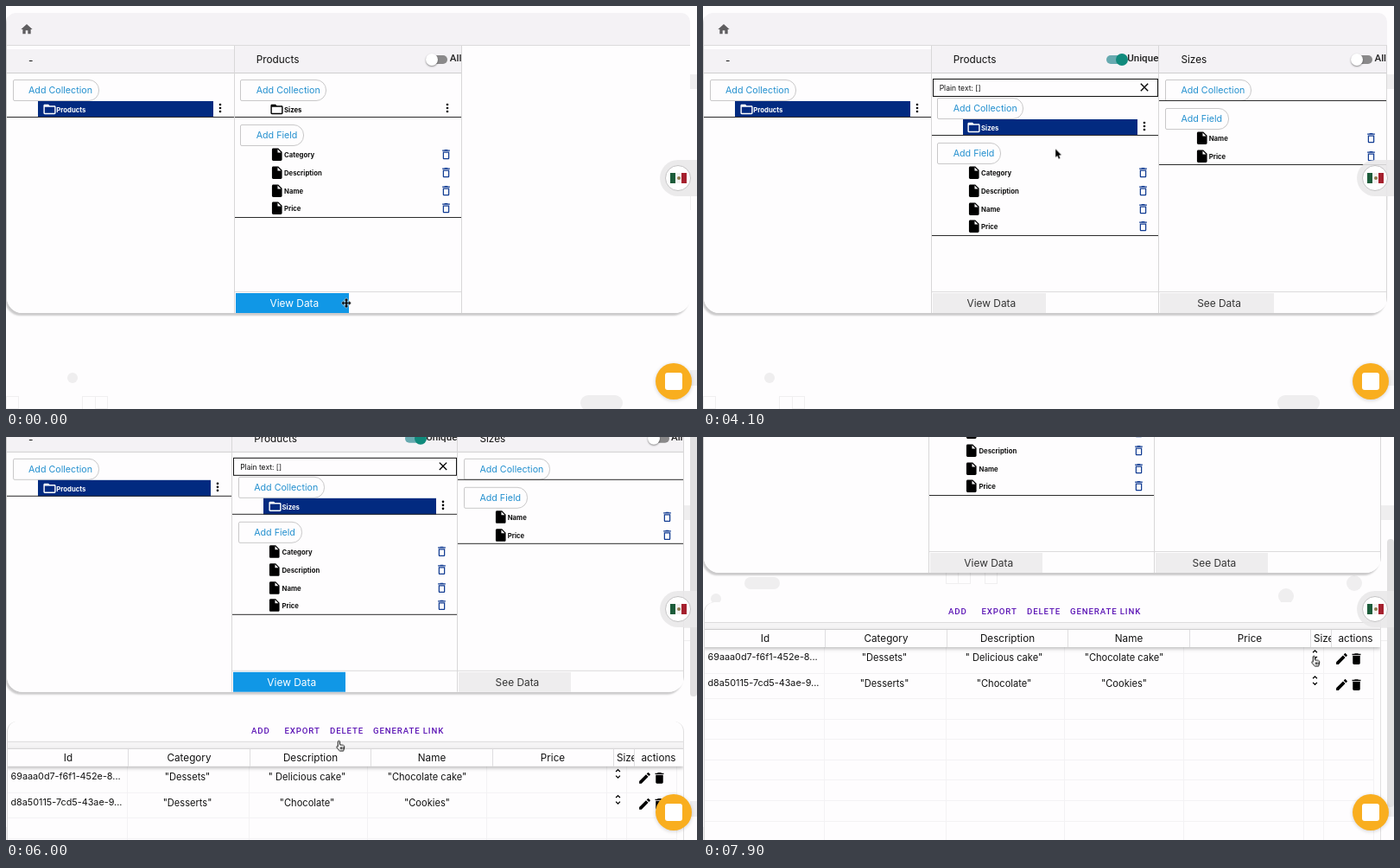
An HTML page for the animation above (8 s loop, 800 px wide and 466 px high).

```html
<!DOCTYPE html>
<html lang="en">
<head>
<meta charset="utf-8">
<title>Collection editor</title>
<style>
html, body { margin: 0; width: 100%; height: 100%; overflow: hidden; background: #fefdfe; }
#stage {
  --w: 263.7px; --drop: 0px; --on: 0; --off: 1; --ripple: 0;
  --row: transparent; --rowx: 37px; --rowink: #000; --third: 0; --table: 0;
  --view: #1097e6; --viewink: #fff; --cross: 1; --arrow: 0; --hand: 0;
  position: relative; width: 800px; height: 466px; overflow: hidden;
  background: #fefdfe; font: 11px Inter, "Open Sans", sans-serif; color: #111;
  animation: state 8s step-end infinite;
}
#stage *, #stage { box-sizing: border-box; }
#stage div, #stage span, #stage svg { position: absolute; }
span { white-space: pre; line-height: 16px; }
.mid { transform: translateX(-50%); }

/* interface states */
@keyframes state {
  3.75% { --view: #eeedee; --viewink: #333; --cross: 0; --arrow: 1; }
  28.75% { --arrow: 0; --hand: 1; }
  31.25% { --drop: 21px; --on: 1; --off: 0; --ripple: 1; }
  33.75% { --arrow: 1; --hand: 0; }
  37.5% { --row: #e6eef6; --rowx: 2px; --arrow: 0; --hand: 1; }
  45% { --ripple: 0; }
  46.25% { --row: #022a80; --rowx: 37px; --rowink: #fff; --third: 1; }
  51.25% { --arrow: 1; --hand: 0; }
  58.75% { --view: #1097e6; --viewink: #fff; --arrow: 0; --hand: 1; }
  68.75% { --w: 261.2px; --table: 1; }
  86.25% { --view: #eeedee; --viewink: #333; }
}
@keyframes scroll {
  0%, 70.6% { transform: translateY(0); }
  75% { transform: translateY(-60px); }
  81.25% { transform: translateY(-157px); }
  86%, 100% { transform: translateY(-198px); }
}
@keyframes thumb {
  0%, 70.6% { transform: translateY(-55px); }
  75% { transform: translateY(-10px); }
  81.25% { transform: translateY(65px); }
  86%, 100% { transform: translateY(118px); }
}
@keyframes point {
  0% { transform: translate(394px, 343.5px); }
  3.75% { transform: translate(395px, 328px); }
  13.75%, 22.5% { transform: translate(399.5px, 237.5px); }
  29%, 33.5% { transform: translate(487px, 61px); }
  40%, 50% { transform: translate(411.5px, 138.5px); }
  60%, 87.5% { transform: translate(385px, 351.5px); }
  90% { transform: translate(394px, 350px); }
  94% { transform: translate(570px, 300px); }
  96.5% { transform: translate(715px, 256px); }
  98.75%, 100% { transform: translate(707px, 253.5px); }
}

/* fixed backdrop */
.blob { background: #efeeef; }
.box { border: 1px solid #f0eff0; }

#doc { left: 0; top: 0; width: 800px; height: 800px; animation: scroll 8s linear infinite; }
#panel {
  left: 1px; top: 8px; width: calc(var(--w) * 3); height: 347px; overflow: hidden;
  border-radius: 10px 10px 18px 18px; background: #fefdfe;
}
#shade {
  left: 1px; top: 8px; width: calc(var(--w) * 3); height: 347px;
  border-radius: 10px 10px 18px 18px; box-shadow: -2px 3px 2px rgba(0, 0, 0, .2);
}
#inner { left: -1px; top: -8px; width: 800px; height: 363px; }
#bar { left: 0; top: 8px; width: 100%; height: 38px; background: #f4f2f5; border-bottom: 1px solid #dcdbdc; }

.col { top: 46px; width: calc(var(--w) + 1px); height: 309px; border-right: 1px solid #d8d7d8; }
.col > .in { left: 0; top: -46px; width: 100%; height: 355px; }
.head { left: 1px; right: 0; top: 46px; height: 32px; background: #f4f2f5; border-bottom: 1px solid #cfcecf; }
.title { left: 26px; top: 54px; font-size: 11.8px; }
.body { left: 0; top: 0; width: 100%; height: 300px; }
.pill {
  left: 7.5px; height: 25px; border: 1px solid #c9c8c9; border-radius: 2px 12px 12px 2px;
  background: #fefdfe; color: #2490cf;
}
.pill span { left: 17.5px; top: 4px; font-size: 10.7px; }
.rule { left: 1px; right: 0; height: 1px; background: #2b2b2b; }
.row { right: 24.2px; height: 19px; }
.name { left: 58.3px; font-size: 7.75px; font-weight: 700; }
.foot { left: 1px; right: 0; top: 330px; height: 25px; border-top: 1px solid #dcdbdc; }
.btn { left: 1px; top: 1px; width: 50%; height: 24px; }
.btn span { left: 50%; top: 3.5px; margin-left: 2.5px; font-size: 11.9px; }
.plain { left: 2px; right: 0; top: 84px; height: 21px; border: 1px solid #111; opacity: var(--on); }
.plain span { left: 7px; top: 2px; font-size: 8.5px; }
.lab { right: 0; top: 52px; font: 500 11.6px/16px Roboto, sans-serif; color: #222; }
.track { width: 21px; height: 10px; top: 57px; border-radius: 5px; }
.knob { width: 14px; height: 14px; top: 55px; border-radius: 50%; }

#table {
  left: 1px; top: 389px; width: calc(var(--w) * 3); height: 420px; opacity: var(--table);
  overflow: hidden; border-radius: 12px 12px 0 0; background: #fefdfe;
  border-left: 1px solid #d9d8d9; border-right: 1px solid #e0dfe0;
}
#grid { left: -2px; top: -389px; width: 800px; height: 810px; }
.act { top: 392px; font: 500 9.67px/16px Roboto, sans-serif; letter-spacing: .0893em; color: #5b14b5; }
.strip { left: 0; top: 412px; width: 784px; height: 8px; background: #f5f4f5; border-top: 1px solid #dddcdd; }
.heads { left: 0; top: 420px; width: 784px; height: 21px; background: #fefdfe;
  border-top: 1px solid #cfcecf; box-shadow: 0 2px 4px rgba(0, 0, 0, .25); }
.heads span { top: 2px; font-size: 11.7px; }
.v { width: 1px; background: #dedddf; }
.faint { background: #f3f2f4; }
.cell { font-size: 11.1px; }

#thumb { left: 792px; top: 0; width: 8px; height: 310px; border-radius: 4px; background: #e1e0e1;
  opacity: var(--table); animation: thumb 8s linear infinite; }
#lang { left: 757px; top: 178px; width: 43px; height: 42px; border-radius: 21px 0 0 21px; background: rgba(233, 232, 233, .88); }
#lang .disc { left: 6px; top: 6px; width: 30px; height: 30px; border-radius: 50%; background: #fff; border: 1px solid #c4c3c4; }
#flag { left: 12px; top: 15px; width: 19px; height: 12px;
  background: linear-gradient(90deg, #1c5c3a 33.3%, #f4f2f2 33.3% 66.6%, #a5202e 66.6%); }
#flag div { left: 7.5px; top: 4px; width: 4px; height: 4px; border-radius: 50%; background: #8d7a4e; }
#chat { left: 752px; top: 413px; width: 42px; height: 42px; border-radius: 50%; background: #f9ae1f;
  box-shadow: 0 1px 4px rgba(0, 0, 0, .18); }
#chat div { left: 11px; top: 11px; width: 20px; height: 20px; border-radius: 3px; background: #fff; }
#cursor { left: 0; top: 0; width: 0; height: 0; animation: point 8s linear infinite; }
#cursor svg { overflow: visible; width: 14px; height: 14px; }
</style>
</head>
<body>
<div id="stage"></div>
<script>
const paths = {
  home: 'M10 20v-6h4v6h5v-8h3L12 3 2 12h3v8z',
  folder: 'M20 6h-8l-2-2H4c-1.1 0-2 .9-2 2v12c0 1.1.9 2 2 2h16c1.1 0 2-.9 2-2V8c0-1.1-.9-2-2-2zm0 12H4V8h16v10z',
  file: 'M6 2c-1.1 0-2 .9-2 2v16c0 1.1.9 2 2 2h12c1.1 0 2-.9 2-2V8l-6-6H6zm7 7V3.5L18.5 9H13z',
  bin: 'M6 19c0 1.1.9 2 2 2h8c1.1 0 2-.9 2-2V7H6v12zM8 9h8v10H8V9zm7.5-5l-1-1h-5l-1 1H5v2h14V4z',
  trash: 'M6 19c0 1.1.9 2 2 2h8c1.1 0 2-.9 2-2V7H6v12zM19 4h-3.5l-1-1h-5l-1 1H5v2h14V4z',
  edit: 'M3 17.25V21h3.75L17.8 9.94l-3.75-3.75L3 17.25zM20.7 7.04c.4-.4.4-1 0-1.4l-2.34-2.35c-.4-.4-1-.4-1.4 0l-1.84 1.83 3.75 3.75z',
  dots: 'M12 8a2 2 0 1 0 0-4 2 2 0 0 0 0 4zm0 2a2 2 0 1 0 0 4 2 2 0 0 0 0-4zm0 6a2 2 0 1 0 0 4 2 2 0 0 0 0-4z',
  sort: 'M12 5.83L15.17 9l1.4-1.4L12 3 7.4 7.6 8.83 9zm0 12.34L8.83 15l-1.4 1.4L12 21l4.6-4.6L15.17 15z',
  close: 'M19 6.4L17.6 5 12 10.6 6.4 5 5 6.4 10.6 12 5 17.6 6.4 19 12 13.4 17.6 19 19 17.6 13.4 12z'
};
const div = (cls, style, inner = '') => `<div class="${cls}" style="${style}">${inner}</div>`;
const text = (cls, style, s) => `<span class="${cls}" style="${style}">${s}</span>`;

// side is "left" or "right"; x and y are the icon's centre
const icon = (name, size, x, y, color = '#000', side = 'left') =>
  `<svg viewBox="0 0 24 24" width="${size}" height="${size}" style="${side}:${x - size / 2}px;top:${y - size / 2}px">` +
  `<path d="${paths[name]}" style="fill:${color}"/></svg>`;

const pill = (label, y, w) => div('pill', `top:${y}px;width:${w}px`, text('', '', label));
const rule = y => div('rule', `top:${Math.floor(y)}px`);

const folderRow = (name, bg, ink, left) =>
  div('row', `left:${left};top:110px;background:${bg}`) +
  icon('folder', 17, 50, 119.5, ink) +
  text('name', `top:111.6px;color:${ink}`, name) +
  icon('dots', 16, 16, 118, '#000', 'right') + rule(128);

const fieldList = (names, y) => pill('Add Field', y, 74) +
  names.map((name, i) => {
    const cy = y + 34.8 + i * 20.8;
    return icon('file', 17.5, 50, cy) + text('name', `top:${cy - 7.8}px`, name) +
      icon('bin', 15, 18, cy - .3, '#123c93', 'right');
  }).join('') + rule(y + 24 + names.length * 20.8);

const switchOff = div('', 'inset:0;opacity:var(--off)',
  div('track', 'right:16px;background:#8a898a') +
  div('knob', 'right:27px;background:#fff;box-shadow:0 1px 2px rgba(0,0,0,.45)') +
  text('lab', '', 'All'));
const switchOn = div('', 'inset:0;opacity:var(--on)',
  div('', 'right:26px;top:45px;width:33px;height:33px;border-radius:50%;background:rgba(110,140,150,.26);opacity:var(--ripple)') +
  div('track', 'right:39px;background:#67aab0') +
  div('knob', 'right:35px;background:#108a7c') +
  text('lab', '', 'Unique'));

const footer = (label, bg, ink) => div('foot', '',
  div('btn', `background:${bg};color:${ink}`, text('mid', '', label)));

const column = (i, inner, style = '') =>
  div('col', `left:calc(var(--w) * ${i});${style}`, div('in', '', inner));

const columns =
  column(0, div('head', 'top:50px;height:28px') + text('title', 'top:55px', '-') +
    pill('Add Collection', 85, 100) + folderRow('Products', '#022a80', '#fff', '37px')) +
  column(1, div('head', '') + text('title', '', 'Products') + switchOff + switchOn +
    div('plain', '', text('', '', 'Plain text: []') + icon('close', 16, 15.5, 8.5, '#000', 'right')) +
    div('body', 'transform:translateY(var(--drop))',
      pill('Add Collection', 85, 100) + folderRow('Sizes', 'var(--row)', 'var(--rowink)', 'var(--rowx)') +
      fieldList(['Category', 'Description', 'Name', 'Price'], 137)) +
    footer('View Data', 'var(--view)', 'var(--viewink)')) +
  column(2, div('head', '') + text('title', '', 'Sizes') +
    div('', 'inset:0;--off:1', switchOff) +
    pill('Add Collection', 85, 100) + rule(109) + fieldList(['Name', 'Price'], 118) +
    footer('See Data', '#eeedee', '#333'), 'opacity:var(--third)');

const mid = (x, y, s, cls = 'mid cell') => text(cls, `left:${x}px;top:${y - 8}px`, s);
const actions = [[284, 'ADD'], [322.5, 'EXPORT'], [375, 'DELETE'], [425, 'GENERATE LINK']]
  .map(([x, s]) => text('act', `left:${x}px`, s)).join('');
const titles = [[72, 'Id'], [212, 'Category'], [352.5, 'Description'], [493, 'Name'], [633, 'Price'], [755.5, 'actions']]
  .map(([x, s]) => text('mid', `left:${x}px`, s)).join('') +
  div('', 'left:707px;top:0;width:20.5px;height:20px;overflow:hidden', text('', 'left:0', 'Sizes'));
const headLines = [141, 282, 422, 563, 703, 727]
  .map(x => div('v', `left:${x}px;top:0;height:20px`)).join('');
const bodyLines = [140, 281, 418, 556, 695, 718, 776]
  .map(x => div('v faint', `left:${x}px;top:441px;height:370px`)).join('') +
  [471, ...Array.from({ length: 13 }, (_, k) => 500 + k * 23.6)]
    .map(y => div('faint', `left:2px;width:775px;top:${y}px;height:1px`)).join('');
const records = [
  ['69aaa0d7-f6f1-452e-8...', '"Dessets"', '" Delicious cake"', '"Chocolate cake"'],
  ['d8a50115-7cd5-43ae-9...', '"Desserts"', '"Chocolate"', '"Cookies"']
].map(([id, cat, desc, name], i) => {
  const y = 452.5 + i * 30;
  return text('cell', `left:5.5px;top:${y - 8}px;font-size:10.8px`, id) +
    mid(210, y, cat) + mid(348.5, y, desc) + mid(487.5, y, name) +
    icon('sort', 15, 708, y - 3.4) + icon('edit', 17, 739.5, y + 1.5) + icon('trash', 17, 756.5, y + 1.5);
}).join('');

const blobs = [[71, 424, 12, 12], [665, 450, 49, 18], [792, 79, 8, 17], [784, 79, 16, 17], [792, 421, 8, 18],
  [700, 215, 12, 12], [640, 228, 41, 14], [48, 162, 41, 14], [666, 175, 18, 18], [745, 160, 18, 18], [9, 181, 12, 12]]
  .map(([x, y, w, h]) => div('blob', `left:${x}px;top:${y}px;width:${w}px;height:${h}px;border-radius:${x > 780 ? 0 : h / 2}px`)).join('');
const boxes = [[0, 451, 15], [88, 451, 16], [103, 451, 15], [751, 221, 11], [761, 221, 11], [777, 220, 16],
  [281, 155, 15], [295, 155, 15], [326, 155, 15]]
  .map(([x, y, s]) => div('box', `left:${x}px;top:${y}px;width:${s}px;height:${s}px`)).join('');

const pointer = (show, x, y, d, fill, line, order) =>
  `<svg style="left:${x}px;top:${y}px;opacity:var(--${show})"><path d="${d}" fill="${fill}" stroke="${line}" stroke-linejoin="round" paint-order="${order}"/></svg>`;
const cursor =
  pointer('cross', 0, 0, 'M0-5.6l2.3 2.5H.8V-.8h2.3v-1.5L5.6 0 3.1 2.3V.8H.8v2.3h1.5L0 5.6l-2.3-2.5h1.5V.8h-2.3v1.5L-5.6 0l2.5-2.3v1.5h2.3v-2.3h-1.5z', '#000', '#fff', 'stroke') +
  pointer('arrow', 0, 0, 'M0 0v9.6l2.2-2 1.5 3.6 1.6-.7-1.5-3.5h3z', '#000', '#fff', 'stroke') +
  pointer('hand', -3.4, -.9, 'M2.3 7.6V2a1.1 1.1 0 0 1 2.2 0v3.3l4 .8q1.4.4 1.3 1.8l-.4 2.4-.8 2.2H4.3L.8 8.4q-.3-1 .6-1.2zM5.2 8v2.6M6.7 8v2.6M8.1 8v2.6', '#fff', '#111', 'fill');

document.getElementById('stage').innerHTML = blobs + boxes +
  `<div id="doc"><div id="shade"></div>
    <div id="panel"><div id="inner"><div id="bar"></div>${icon('home', 16, 24, 26.5, '#5f5e60')}${columns}</div></div>
    <div id="table"><div id="grid">${actions}${bodyLines}${records}
      <div class="strip"></div><div class="heads">${titles}${headLines}</div></div></div>
  </div>
  <div id="thumb"></div>
  <div id="lang"><div class="disc"></div><div id="flag"><div></div></div></div>
  <div id="chat"><div></div></div>
  <div id="cursor">${cursor}</div>`;
</script>
</body>
</html>
```
